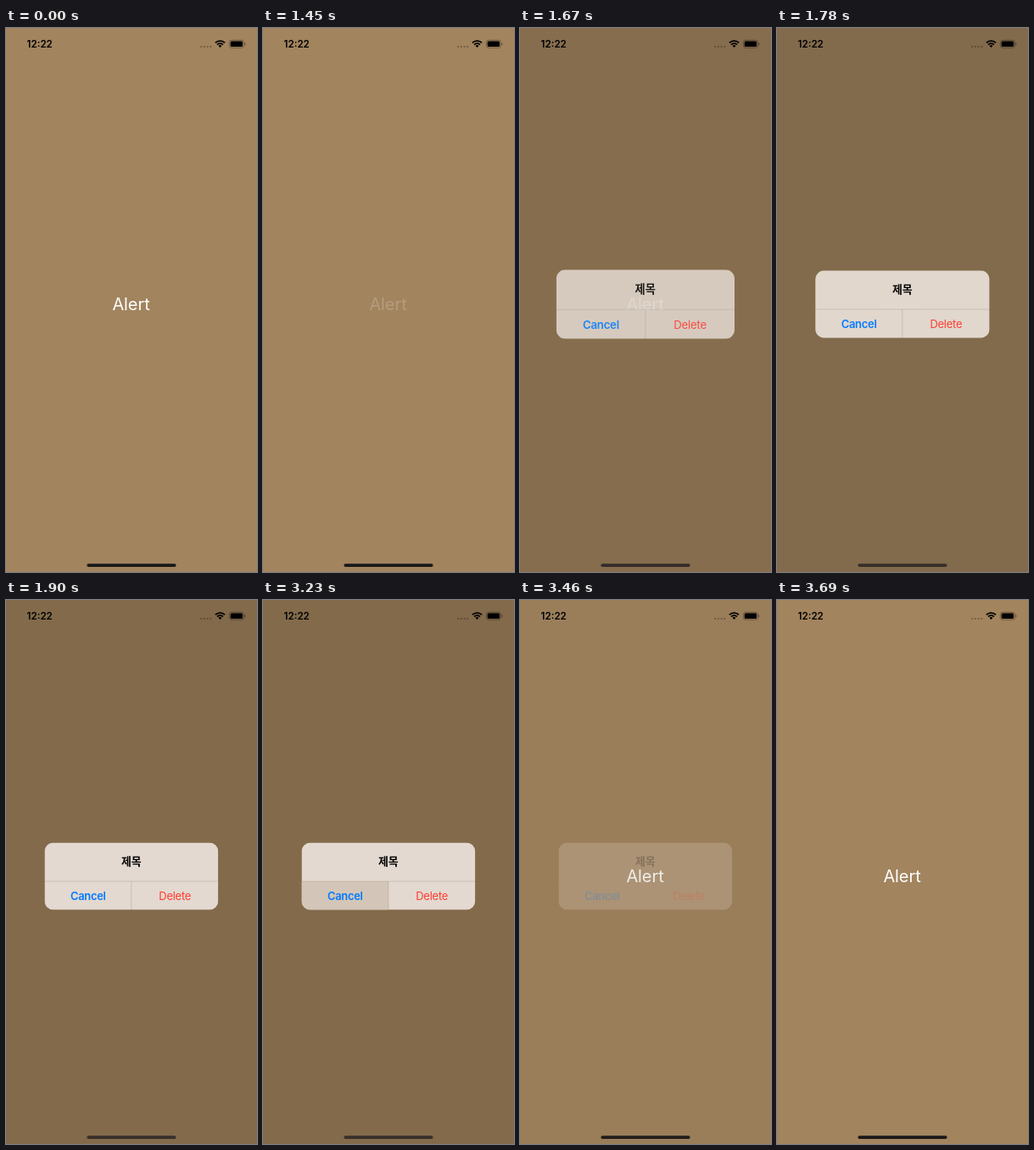
These frames come from a looping animation (296 px wide and 640 px high, 3.79 s). An HTML page with a canvas:

```html
<!DOCTYPE html>
<html lang="ko">
<head>
<meta charset="utf-8">
<title>Alert</title>
<style>
html, body { margin: 0; width: 100%; height: 100%; overflow: hidden; background: #a2845e; }
canvas { display: block; width: 296px; height: 640px; }
</style>
</head>
<body>
<canvas id="stage"></canvas>
<script>
const W = 296, H = 640, LOOP = 3790;
const LATIN = 'Inter, "Liberation Sans", sans-serif';
const KOREAN = '"Noto Sans CJK KR", "Noto Sans CJK", sans-serif';
const STEPS = [0, 1450, 1550, 1670, 1780, 1900, 3230, 3340, 3460, 3580, 3690];
const PRESS = 1450, OPEN = 1516, TAP = 3230, CLOSE = 3338;
const BOX = { x: 45.5, y: 285.4, w: 204.8, h: 79.2, r: 10.6, split: 331, mid: 147.9 };

const canvas = document.getElementById('stage');
const ctx = canvas.getContext('2d');
const ratio = window.devicePixelRatio || 1;
canvas.width = W * ratio;
canvas.height = H * ratio;

// Critically damped spring, 0 to 1.
function spring(ms) {
  if (ms <= 0) return 0;
  const x = 22.855 * ms / 1000;
  return 1 - (1 + x) * Math.exp(-x);
}

function pose(now) {
  const t = STEPS.filter(s => s <= now).pop();
  const shown = spring(t - OPEN);
  const hidden = t >= STEPS[STEPS.length - 1] ? 1 : spring(t - CLOSE);
  return {
    alpha: t < CLOSE ? shown : 1 - hidden,
    scale: 1.2 - 0.2 * shown,
    label: t < PRESS ? 1 : 0.2 + 0.8 * shown,
    pressed: t >= TAP && t < CLOSE
  };
}

function text(str, x, y, font, color, spacing = 0) {
  ctx.font = font;
  ctx.letterSpacing = spacing + 'px';
  ctx.fillStyle = color;
  ctx.fillText(str, x, y);
}

function rect(x, y, w, h, color) {
  ctx.fillStyle = color;
  ctx.fillRect(x, y, w, h);
}

function roundPath(x, y, w, h, r) {
  ctx.beginPath();
  ctx.roundRect(x, y, w, h, r);
}

function fillRound(x, y, w, h, r, color) {
  roundPath(x, y, w, h, r);
  ctx.fillStyle = color;
  ctx.fill();
}

function drawWifi(x, y) {
  const from = -Math.PI * 0.75, to = -Math.PI * 0.25;
  ctx.strokeStyle = ctx.fillStyle = '#000';
  ctx.lineWidth = 1.8;
  for (const r of [7.9, 4.9]) {
    ctx.beginPath();
    ctx.arc(x, y, r, from, to);
    ctx.stroke();
  }
  ctx.beginPath();
  ctx.moveTo(x, y);
  ctx.arc(x, y, 2.8, from, to);
  ctx.fill();
}

function drawStatusBar() {
  text('12:22', 39.7, 23.1, `600 11.6px ${LATIN}`, '#000');
  ctx.fillStyle = 'rgba(0,0,0,.3)';
  for (let i = 0; i < 4; i++) {
    ctx.beginPath();
    ctx.arc(230.2 + i * 3.7, 22, 1.1, 0, 7);
    ctx.fill();
  }
  drawWifi(252.5, 23);
  roundPath(263.4, 14.3, 17, 9, 2.6);
  ctx.strokeStyle = 'rgba(0,0,0,.38)';
  ctx.lineWidth = 0.8;
  ctx.stroke();
  fillRound(264.7, 15.6, 14.4, 6.4, 1.5, '#000');
  fillRound(281.4, 17.3, 1, 3.1, 0.5, 'rgba(0,0,0,.4)');
}

function drawAlert(p) {
  const { x, y, w, h, r, split, mid } = BOX;
  const cx = x + w / 2, cy = y + h / 2;
  ctx.save();
  ctx.translate(cx, cy);
  ctx.scale(p.scale, p.scale);
  ctx.translate(-cx, -cy);
  ctx.globalAlpha = p.alpha;
  ctx.save();
  roundPath(x, y, w, h, r);
  ctx.clip();
  rect(x, y, w, h, '#e3d9d0');
  if (p.pressed) rect(x, split, mid - x, y + h - split, '#d3c6b8');
  ctx.globalAlpha = p.alpha * p.alpha;
  rect(x, split - 0.4, w, 0.8, 'rgba(70,55,40,.2)');
  rect(mid - 0.4, split, 0.8, y + h - split, 'rgba(70,55,40,.2)');
  ctx.restore();
  text('제목', 147.8, 312.4, `600 12.9px ${KOREAN}`, '#000');
  text('Cancel', 96.8, 353, `600 12.9px ${LATIN}`, '#007aff', -0.25);
  text('Delete', 199.2, 353, `400 12.9px ${LATIN}`, '#ff3b30', -0.2);
  ctx.restore();
}

function draw(now) {
  const p = pose(now % LOOP);
  ctx.setTransform(ratio, 0, 0, ratio, 0, 0);
  ctx.textAlign = 'center';
  rect(0, 0, W, H, '#a2845e');
  text('Alert', 147.5, 332.3, `400 20px ${LATIN}`, `rgba(255,255,255,${p.label})`, -0.1);
  rect(0, 0, W, H, `rgba(0,0,0,${0.2 * p.alpha})`);
  drawStatusBar();
  const mix = (a, b) => Math.round(a + (b - a) * p.alpha);
  fillRound(95.4, 630.2, 105.2, 3.8, 1.9, `rgb(${mix(26, 56)},${mix(24, 47)},${mix(24, 42)})`);
  if (p.alpha > 0) drawAlert(p);
}

const start = performance.now();
function frame() {
  draw(performance.now() - start);
  requestAnimationFrame(frame);
}
frame();
</script>
</body>
</html>
```
